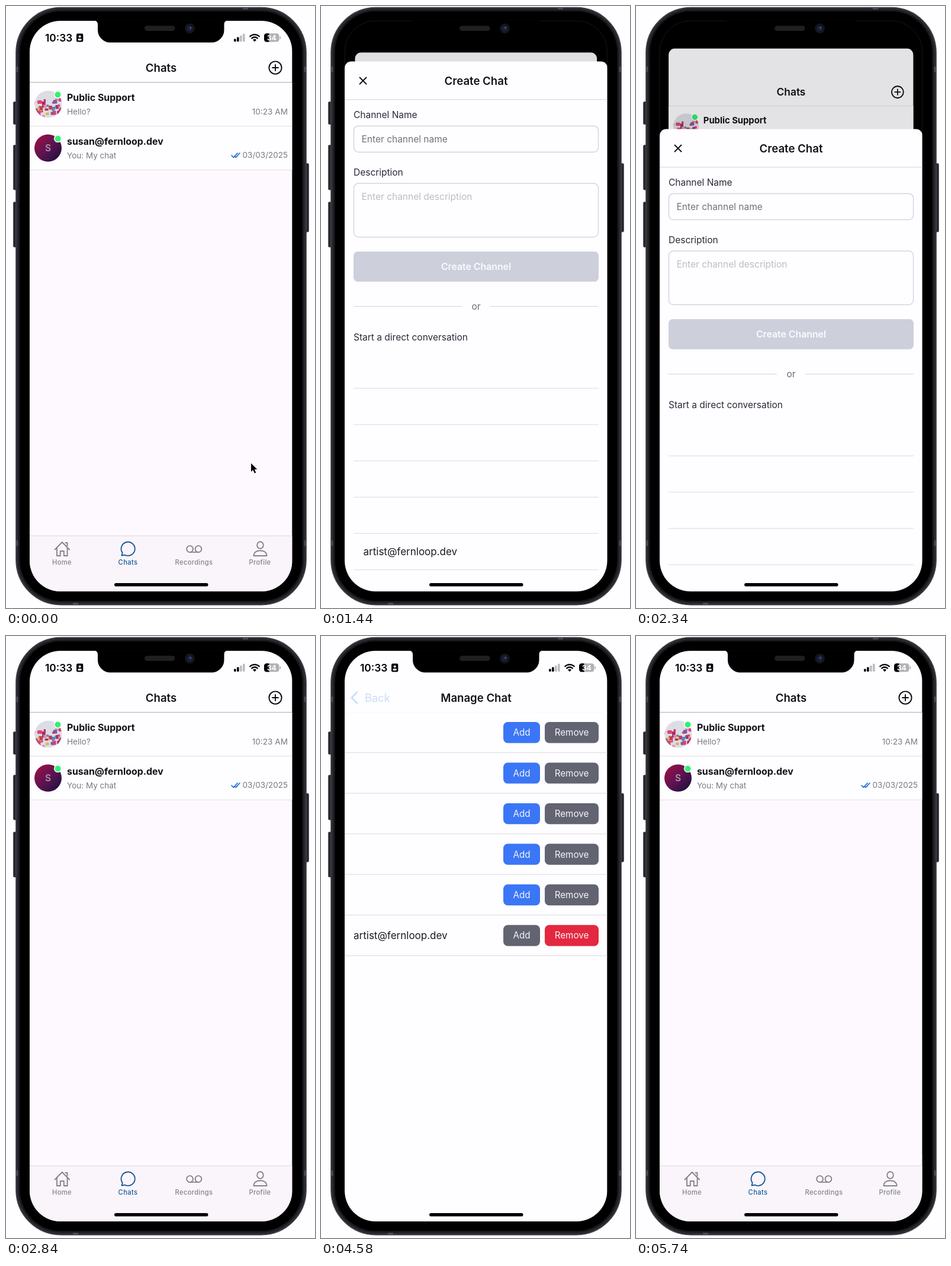
An HTML page for the animation above (6.74 s loop, 522x1015 px).

```html
<!DOCTYPE html>
<html lang="en">
<head>
<meta charset="utf-8">
<title>Chat app walkthrough</title>
<style>
  html, body { margin: 0; width: 100%; height: 100%; overflow: hidden; background: #fefdff; }
  svg { display: block; width: 100%; height: 100%; }
  text { font-family: Inter, "Liberation Sans", sans-serif; white-space: pre; }
</style>
</head>
<body>
<svg id="stage" viewBox="0 0 522 1015"></svg>
<script>
const LOOP = 6740;
const WHITE = '#fefdff', PAGE = '#fdf9fe', BLUE = '#1a6ce6', INK = '#121216', GRAY = '#7b797e';
const USER = 'susan@fernloop.dev', GUEST = 'artist@fernloop.dev';
const stage = document.getElementById('stage');

// Drawing helpers
const text = (s, x, y, size, fill = INK, weight = 400, anchor = 'start', extra = '') =>
  `<text x="${x}" y="${y}" font-size="${size}" fill="${fill}" font-weight="${weight}" text-anchor="${anchor}" ${extra}>${s}</text>`;
const rect = (x, y, w, h, fill, r = 0, extra = '') =>
  `<rect x="${x}" y="${y}" width="${w}" height="${h}" rx="${r}" fill="${fill}" ${extra}/>`;
const circle = (x, y, r, fill, extra = '') =>
  `<circle cx="${x}" cy="${y}" r="${r}" fill="${fill}" ${extra}/>`;
const line = (d, stroke, w = 2, extra = '') =>
  `<path d="${d}" fill="none" stroke="${stroke}" stroke-width="${w}" stroke-linecap="round" stroke-linejoin="round" ${extra}/>`;
const rule = (x1, x2, y, color) => rect(x1, y - 0.6, x2 - x1, 1.2, color);
const ticks = (x, y) =>
  line(`M${x + 1} ${y + 1}l3.4 3.4 6.6-7.4M${x + 7} ${y + 3.2}l1.2 1.2 6.6-7.4`, '#1f6dd6', 1.7);
const many = (n, f) => Array.from({ length: n }, (_, i) => f(i)).join('');

function seeded(seed) {
  return () => (seed = (seed * 16807) % 2147483647) / 2147483647;
}

function crowd() {
  const rnd = seeded(77);
  const tones = ['#d63f7c', '#c23a66', '#e48db2', '#d9b24c', '#4b8fb8', '#a12a5c', '#ead3e0', '#7a5a9c'];
  return many(46, i => {
    const x = 48 + rnd() * 42, y = 158 + rnd() * 28 - (x - 48) * 0.12;
    return rect(x.toFixed(1), y.toFixed(1), (3 + rnd() * 4).toFixed(1), (3 + rnd() * 4).toFixed(1), tones[i % 8], 1.2);
  }) + rect(53, 159, 8, 6, '#d8457f', 1.5);
}

const online = y => circle(87.5, y, 6.6, WHITE) + circle(87.5, y, 5, '#30f270');

function tab(x, label, icon, color) {
  return `<g fill="none" stroke="${color}" stroke-width="1.9" stroke-linecap="round" stroke-linejoin="round">${icon}</g>` +
    text(label, x, 942, 11.2, color, 500, 'middle', 'letter-spacing=".35"');
}

function chatsPage() {
  const off = '#858388', on = '#1b5b99';
  return rect(40, 129, 444, 858, PAGE) + rect(40, 129, 444, 147, WHITE) +
    rule(40, 484, 129.2, '#e6e3e8') + rule(40, 484, 202.6, '#e6e3e8') + rule(40, 484, 276.4, '#e6e3e8') +
    `<g clip-path="url(#face)">${circle(71.5, 165.5, 23, '#dddde5')}${crowd()}</g>` + online(149.5) +
    circle(71, 239.5, 23, 'url(#wine)') + text('S', 71, 245.2, 15.5, '#a993ae', 600, 'middle') + online(223.7) +
    text('Public Support', 103, 160.2, 15.9, INK, 700) + text('Hello?', 103, 183, 13.6, GRAY) +
    text('10:23 AM', 476, 183, 13.6, GRAY, 400, 'end') +
    text(USER, 103, 234, 15.9, INK, 700) + text('You: My chat', 103, 256.7, 13.5, GRAY) +
    ticks(380, 251) + text('03/03/2025', 476, 256, 13.5, GRAY, 400, 'end') +
    rect(40, 893, 444, 94, '#f9f5fb') + rule(40, 484, 893.4, '#dfdce2') +
    tab(94.5, 'Home', '<path d="M82.5 916.5L94.8 904l12.3 12.5M86 913.5v13.5h5.8v-8h6v8h5.8v-13.500M100.500 905h3v5"/>', off) +
    tab(206, 'Chats', '<path d="M195.500 926.500l1.200-4.600A11.600 11.600 0 1 1 201 925.600z"/>', on) +
    tab(317.500, 'Recordings', '<circle cx="310.600" cy="915.500" r="5.400"/><circle cx="325" cy="915.500" r="5.400"/><path d="M310.600 920.900H325"/>', off) +
    tab(429, 'Profile', '<ellipse cx="429.500" cy="909" rx="5.300" ry="5.800"/><path d="M418.500 927c0-6 5-8.800 11-8.800s11 2.800 11 8.800z"/>', off);
}

function chatPage() {
  const icon = '#707074';
  return rect(40, 129, 444, 858, PAGE) +
    rect(215, 769.5, 95, 18.5, '#2d2a30', 9.2) + text('03/03/2025', 262, 783.7, 13.4, '#f6f4f8', 400, 'middle') +
    '<path d="M397 797h60a19 19 0 0 1 19 19v20.500H397a19 19 0 0 1-19-19v-1.500a19 19 0 0 1 19-19z" fill="#dfeeff"/>' +
    text('My chat', 397.5, 822.7, 15.3) + text('2', 392, 857, 13.5, '#1c62d0', 700) + ticks(405, 851) +
    text('1:51 PM', 475.5, 856, 13.5, GRAY, 400, 'end') +
    rect(40, 874, 444, 113, WHITE) + rule(40, 484, 874.5, '#e6e3e8') +
    circle(69, 912, 13.8, 'none', `stroke="${icon}" stroke-width="2.8"`) + line('M69 905.500v13M62.500 912h13', icon, 2.8) +
    `<path d="M114.500 898l-11.500 16h7.200l-2.800 13.500 12.300-17.500h-7.400z" fill="${icon}"/>` +
    rect(141, 886, 284.5, 51.5, WHITE, 25.7, 'stroke="#e6e3e8" stroke-width="1.2"') +
    text('Send a message', 160.5, 918.3, 17.5, '#79777c') +
    circle(455.3, 912, 18.3, '#dad7dc') + line('M448.500 912h12.500M456 906.500l5.500 5.500-5.500 5.500', '#fff', 2.8);
}

function managePage() {
  const button = (x, y, w, label, fill) => rect(x, y, w, 35.4, fill, 7.5) +
    text(label, x + w / 2, y + 23.2, 15.2, '#f6f6fa', 400, 'middle');
  return rect(40, 129, 444, 858, WHITE) + rule(40, 484, 128.500, '#f3f1f5') + many(6, i => {
    const y = 145 + 68.45 * i, last = i === 5;
    return button(308, y, 62, 'Add', last ? '#626472' : '#3b76f6') +
      button(378, y, 91, 'Remove', last ? '#e3283f' : '#626472') + rule(40, 484, y + 51.7, '#e0dee6');
  }) + text(GUEST, 55, 511.2, 17, '#1b1a24');
}

// Sheet coordinates count from its top edge.
function sheet() {
  const label = '#2a2937', edge = 'stroke="#cfcdd7" stroke-width="1.2"';
  return '<path d="M40 1000V11a11 11 0 0 1 11-11H473a11 11 0 0 1 11 11V1000z" fill="#fefdff"/>' +
    line('M65.500 27l11 11M76.500 27l-11 11', INK, 1.9) +
    text('Create Chat', 262, 39.2, 18.6, INK, 600, 'middle') + rule(40, 484, 64.3, '#dad8de') +
    text('Channel Name', 55, 95.5, 15.5, label) + rect(55.5, 108.8, 413, 44, WHITE, 7.5, edge) +
    text('Enter channel name', 68.5, 136.3, 15.5, '#737177') +
    text('Description', 55, 192.5, 15.5, label) + rect(55.5, 205.6, 413, 90.5, WHITE, 7.5, edge) +
    text('Enter channel description', 68.5, 233.4, 15.5, '#bebcc2') +
    rect(55, 320.5, 414, 50.7, '#cdcfdb', 7) + text('Create Channel', 262, 351.2, 15.8, '#fbfaff', 600, 'middle') +
    rule(55, 238, 413, '#d9d8e1') + rule(285.5, 469, 413, '#d9d8e1') + text('or', 262, 418.3, 15.5, '#6c6b78', 400, 'middle') +
    text('Start a direct conversation', 55, 470, 15.5, label) +
    many(6, i => rule(55, 469, 551 + 61.2 * i, '#e0dfe7')) + text(GUEST, 71.5, 832.6, 17, '#1b1a24');
}

function statusBar() {
  return text('10:33', 66, 59.7, 17.3, '#000', 600) +
    rect(119, 46.5, 11.3, 14, '#000', 2.2) + circle(124.6, 51.6, 2, WHITE) + rect(121.4, 55, 6.4, 3.2, WHITE, 1.6) +
    many(4, i => rect(385 + 5 * i, 55.5 - 2.9 * i, 3.6, 4.4 + 2.9 * i, i < 2 ? '#000' : '#bdbbc0', 1)) +
    line('M412.200 51.300a11 11 0 0 1 15.600 0M415.100 54.500a7 7 0 0 1 9.800 0', '#000', 2.3) +
    '<path d="M420 60.300l-3-3.200a4.300 4.300 0 0 1 6 0z"/>' +
    rect(436, 46.300, 25.500, 14.200, '#b3b1b6', 4.2) +
    '<path d="M440.200 46.300h4.300v14.200h-4.300a4.200 4.200 0 0 1-4.200-4.200v-5.800a4.200 4.200 0 0 1 4.200-4.200z"/>' +
    rect(462.4, 51.2, 1.8, 4.6, '#b3b1b6', 0.9) + text('34', 448.800, 57.700, 12.3, '#fff', 700, 'middle');
}

function phone() {
  const side = (x, y, h) => rect(x, y, 6, h, '#26272d', 1.8, 'stroke="#43444b" stroke-width=".8"');
  const band = (x, y, w, h) => rect(x, y, w, h, '#4b4b52');
  return side(12.4, 161.5, 38) + side(12.4, 234.5, 75.5) + side(12.4, 330.5, 76) + side(505.4, 265.5, 115.5) +
    rect(16.8, 2.3, 490.4, 1007.6, '#2b2b31', 76, 'stroke="#46464c" stroke-width="1.2"') +
    band(400, 2.5, 9, 5) + band(113, 1004.7, 9, 5) +
    many(4, i => band(i % 2 ? 502.5 : 17, i < 2 ? 102 : 901, 4.500, 9.500)) +
    rect(20.5, 6, 483, 1000, '#1a1a1e', 72) + rect(23.5, 9, 477, 994, '#000', 69) +
    rect(40, 25, 443.5, 962, '#000', 52, 'stroke="#161619" stroke-width="1"');
}

const notch = '<path d="M148 24.500h227c-4 0-6.500 2-6.500 7v9a21 21 0 0 1-21 21H176a21 21 0 0 1-21-21v-9c0-5-2.500-7-7-7z"/>' +
  rect(234, 33.3, 51.5, 8.6, '#1f1f22', 4.3) +
  circle(310.5, 38, 8.4, '#14141c') + circle(310.5, 38, 4.8, '#1c2036') + circle(311.5, 36.8, 1.5, '#4756a0');

const title = (id, s) => `<g id="title${id}">${text(s, 262, 110.6, 18.6, INK, 600, 'middle')}</g>`;
const back = (id, s) => `<g id="back${id}">${text(s, 74, 110.6, 18.2, BLUE)}</g>`;

stage.innerHTML = `
<defs>
  <clipPath id="screen"><rect x="40" y="25" width="443.5" height="962" rx="52"/></clipPath>
  <clipPath id="card"><rect id="cardShape" x="40" y="25" width="443.5" height="962" rx="12"/></clipPath>
  <clipPath id="face"><circle cx="71.5" cy="165.5" r="23"/></clipPath>
  <linearGradient id="wine" x1=".1" y1=".1" x2=".9" y2=".9">
    <stop offset="0" stop-color="#980f45"/><stop offset=".5" stop-color="#5f1350"/><stop offset="1" stop-color="#21113f"/>
  </linearGradient>
</defs>
${phone()}
<g clip-path="url(#screen)">
  <g id="nav"><g clip-path="url(#card)">
    <g id="page0">${chatsPage()}</g>
    <g id="page1">${chatPage()}</g>
    <g id="page2">${managePage()}</g>
    ${rect(40, 25, 444, 103.6, WHITE)}
    ${title(0, 'Chats')}${title(1, USER)}${title(2, 'Manage Chat')}
    <g id="backs">
      <g id="chevron">${line('M61 94.800L51.800 104l9.200 9.200', BLUE, 2.7)}</g>
      ${back(1, 'Chats')}${back(2, 'Back')}
    </g>
    <g id="plus">${circle(455, 104, 10.6, 'none', 'stroke="#0c0c10" stroke-width="1.9"')}${line('M455 99v10M450 104h10', '#0c0c10', 1.9)}</g>
    <g id="manage">${text('Manage', 466.5, 109.5, 15.3, INK, 400, 'end')}</g>
    <rect id="dim" x="40" y="25" width="444" height="962"/>
  </g></g>
  <g id="status">${statusBar()}</g>
  <g id="sheet">${sheet()}</g>
  ${rect(183, 973, 158.5, 5.6, '#000', 2.8)}
</g>
${notch}
<path id="cursor" d="M414 771v14.200l3.300-3 2.500 5.600 2.500-1.100-2.500-5.400h4.500z" stroke="#fff" stroke-width="1.400" paint-order="stroke"/>`;

const el = {};
stage.querySelectorAll('[id]').forEach(n => el[n.id] = n);
const clamp = v => Math.max(0, Math.min(1, v));
const move = (n, x, y = 0) => n.setAttribute('transform', `translate(${x.toFixed(2)} ${y.toFixed(2)})`);
const fade = (n, o) => n.setAttribute('opacity', clamp(o).toFixed(3));
const show = (n, on) => n.setAttribute('visibility', on ? 'visible' : 'hidden');

// Critically damped spring from 0 to 1, time in ms
const RATE = 0.022;
function spring(t) {
  if (t <= 0) return 0;
  const v = 1 - (1 + RATE * t) * Math.exp(-RATE * t);
  return v > 0.9998 ? 1 : v;
}

// How far the sheet is open: springs up, is dragged down, then released
function sheetOpen(t) {
  if (t < 2100) return spring(t - 1090);
  if (t < 2340) return 1 - 0.131 * ((t - 2100) / 240) ** 2.5;
  const s = t - 2340, rest = 0.869, speed = 0.00136;
  const v = (rest + (RATE * rest - speed) * s) * Math.exp(-RATE * s);
  return v < 0.0007 ? 0 : v;
}

// Depth in the page stack: 0 list, 1 chat, 2 manage
const depthAt = t => spring(t - 3030) + spring(t - 3750) - spring(t - 4710) - spring(t - 5250);

function draw(t) {
  const p = sheetOpen(t), d = depthAt(t);
  const scale = 1 - 0.0782 * p;
  el.nav.setAttribute('transform', `translate(261.75 ${25 + 53.5 * p}) scale(${scale}) translate(-261.75 -25)`);
  fade(el.dim, 0.122 * p);
  fade(el.status, 1 - p * 3);
  show(el.sheet, p > 0);
  move(el.sheet, 0, 987 - 897 * p);

  for (let i = 0; i < 3; i++) {
    const u = i - d;
    show(el['page' + i], u > -1 && u < 1);
    move(el['page' + i], u > 0 ? 443.5 * u : 133 * u);
    move(el['title' + i], u > 0 ? 200 * u : 163 * u);
    fade(el['title' + i], 1 - Math.abs(u) * 1.3);
    if (i) {
      move(el['back' + i], u > 0 ? 163 * u : 90 * u);
      fade(el['back' + i], 1 - Math.abs(u) * 1.2);
    }
  }
  fade(el.chevron, d);
  fade(el.plus, 1 - d * 1.4);
  fade(el.manage, 1 - Math.abs(d - 1) * 1.4);
  fade(el.backs, t >= 4580 && t < 5000 ? 0.22 + 0.78 * clamp((t - 4740) / 240) : 1);
  show(el.cursor, t < 20);
}

let start = null;
function tick(now) {
  if (start === null) start = now;
  draw((now - start) % LOOP);
  requestAnimationFrame(tick);
}
draw(0);
requestAnimationFrame(tick);
</script>
</body>
</html>
```
